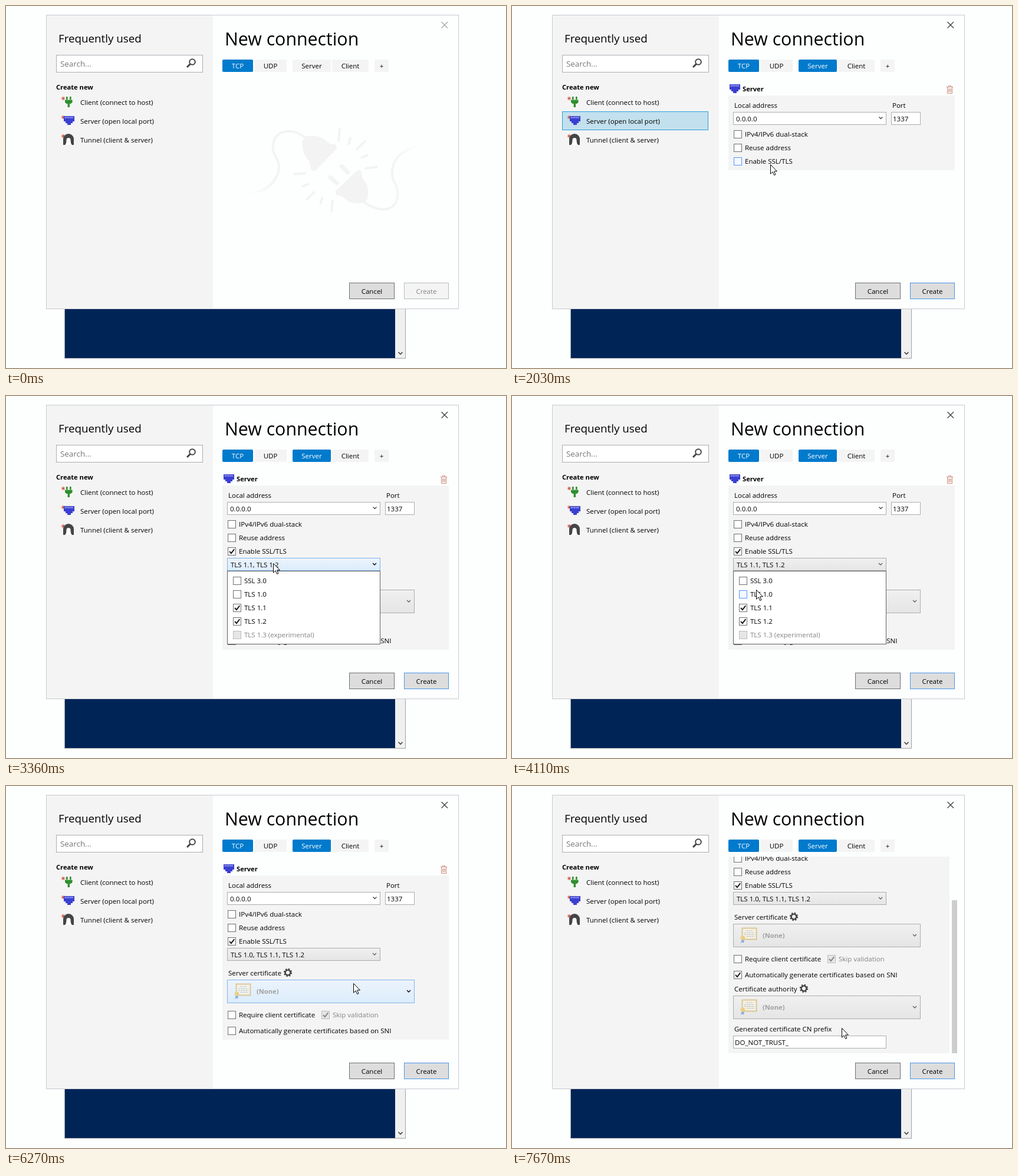
An HTML page for the animation above (8 s loop, 848 px wide and 615 px high).

```html
<!DOCTYPE html>
<html lang="en">
<head>
<meta charset="utf-8">
<title>New connection</title>
<style>
html, body { margin: 0; width: 100%; height: 100%; overflow: hidden; background: #fdfefe; }
#stage { display: block; width: 848px; height: 615px; }
text { font: 11.5px "Open Sans", "Noto Sans", sans-serif; fill: #000; white-space: pre; }
text.bold { font-size: 11.15px; font-weight: 700; }
text.mid { text-anchor: middle; }
text.title { font-size: 30.3px; }
text.sub { font-size: 18.8px; }
text.search { font-size: 13.4px; fill: #767676; }
text.none { fill: #a0a0a0; }
.line { fill: none; stroke: #444; }
.field { fill: #fff; stroke: #abadb3; }
.tab { fill: #f4f4f4; }
.tab.on { fill: #007acc; }
.tab.on + text { fill: #fff; }
.item rect { fill: #26a0da; fill-opacity: 0; stroke: #26a0da; stroke-opacity: 0; }
.item.hot rect { fill-opacity: .12; stroke-opacity: .66; }
.item.on rect { fill-opacity: .24; stroke-opacity: 1; }
.button rect { fill: #ddd; stroke: #707070; }
#create rect { stroke: #4a96e8; }
#create.off rect { fill: #f4f4f4; stroke: #b8bcbe; }
#create.off text { fill: #838383; }
.check .box { fill: #fff; stroke: #707070; }
.check.hot .box { fill: #f3f9ff; stroke: #5593ff; }
.check.off .box { fill: #e6e6e6; stroke: #bcbcbc; }
.check.off text { fill: #838383; }
.tick { display: none; fill: none; stroke: #212121; stroke-width: 2; }
.check.off .tick { stroke: #888; }
.on .tick { display: inline; }
.combo rect.face { fill: url(#grey); stroke: #acacac; }
.combo .chevron { stroke: #606060; }
.combo.hot rect.face { fill: url(#blue); stroke: #7eb4ea; }
.combo.hot .chevron { stroke: #000; }
</style>
</head>
<body>
<svg id="stage" viewBox="0 0 848 615"></svg>
<script>
const LOOP = 8000, MAX_SCROLL = 95, VIEW = { top: 120, height: 334 };
const $ = id => document.getElementById(id);

// Drawing helpers
const text = (x, y, s, cls = '') => `<text x="${x}" y="${y}" class="${cls}">${s}</text>`;
const rect = (x, y, w, h, attrs = '') => `<rect x="${x}" y="${y}" width="${w}" height="${h}" ${attrs}/>`;
const path = (d, attrs = 'class="line"') => `<path d="${d}" ${attrs}/>`;
const at = (x, y, s) => `<g transform="translate(${x} ${y})">${s}</g>`;
const chevron = (x, y) => path(`M${x - 3} ${y - 1.5}l3 3 3-3`, 'class="line chevron" stroke-width="1.3"');
const hit = (x, y, w, h) => `data-hit="${[x, y, w, h]}"`;

const tab = (id, x, w, s, cls = '') =>
  rect(x, 91, w, 21, `id="${id}" rx="2" class="tab ${cls}"`) + text(x + w / 2, 106, s, 'mid');
const button = (id, x, w, s, cls = '') =>
  `<g id="${id}" class="button ${cls}">${rect(x + .5, 470.5, w, 27)}${text(x + w / 2 + .5, 489, s, 'mid')}</g>`;
const check = (id, x, y, w, s, cls = '') =>
  `<g id="${id}" class="check ${cls}" ${hit(x, y - 1, w, 16)}>
    ${rect(x + .5, y + .5, 13, 13, 'class="box"')}
    ${path(`M${x + 3} ${y + 7}l3 3.2 5.3-7`, 'class="tick"')}${text(x + 19, y + 11, s)}</g>`;
const combo = (id, y, w, h, content) =>
  `<g id="${id}" class="combo" ${hit(375, y, w + 1, h + 1)}>
    ${rect(375.5, y + .5, w, h, 'class="face"')}${content}${chevron(366 + w, y + h / 2)}</g>`;

const spark = path('M-3.2 0H3.2M0-3.2V3.2M-2.3-2.3 2.3 2.3M-2.3 2.3 2.3-2.3', 'stroke="#c6402c" stroke-width=".9"');
const plug = path('M2 0H4.6V5H2ZM8 0H10.6V5H8ZM0 5.5H12.6V9.5L10 12H8V18H4.6V12H2.6L0 9.5Z', 'fill="#2f8f2f"');
const jack = path('M0 0H18V9H15V12H12V15H6V12H3V9H0Z', 'fill="#3a3fd0"') +
  path('M2.5 1V4M5 1V4M7.5 1V4M10 1V4M12.5 1V4M15 1V4', 'stroke="#c9ccf5"');
const arch = path('M0 18V8A9 9 0 0 1 18 8V18Z', 'fill="#454545"') +
  path('M3 18Q5.5 16 5.5 9.5A3.5 3.5 0 0 1 12.5 9.5Q12.5 16 15 18Z', 'fill="#fff"');
const gear = '<circle r="4.4" class="line" stroke-width="2.4"/>' +
  '<circle r="6" class="line" stroke-width="2.4" stroke-dasharray="2.356"/>';
const certificate = `<g opacity=".6">
  ${rect(2.5, .5, 24, 19, 'fill="#fbf3dc" stroke="#d2ae62" stroke-width="2"')}
  ${path('M9 5H20M6 8.5H23M6 11.5H23M10 14.5H23', 'stroke="#8fa3bd" stroke-dasharray="3 1"')}
  ${path('M2 19L0 26 3 24 5 26 6 19Z', 'fill="#4b83db"')}
  <circle cx="3.5" cy="17" r="3.8" fill="#efbd42"/></g>`;
const certBox = (id, y) =>
  combo(id, y, 317, 39, at(388, y + 7, certificate) + text(425, y + 24, '(None)', 'bold none'));
const item = (id, y, icon, s) =>
  `<g id="${id}" class="item" ${hit(85, y, 248, 32)}>${rect(85.5, y + .5, 247, 31)}
    ${at(97, y + 10, spark)}${icon}${text(126, y + 21, s)}</g>`;

const watermark = `<g id="watermark" fill="#f3f3f3" stroke="#f3f3f3" stroke-width="4">
  <path d="M414 317C447 317 463 290 463 273C463 258 450 252 453 234C457 210 487 205 510 226" fill="none" stroke="url(#fadeL)"/>
  <path d="M606 332C628 350 662 353 664 322C666 303 653 299 655 280C657 257 677 240 704 239" fill="none" stroke="url(#fadeR)"/>
  <path d="M504 229L509 223Q528 217 544 231L551 236Q561 234 560 242L525 278Q518 282 518 274L516 264Q501 249 504 229Z" stroke-width="2"/>
  <path d="M560 315L595 281Q602 278 602 285L604 294Q617 309 612 327L607 333Q587 338 573 325L567 321Q559 322 560 315Z" stroke-width="2"/>
  <path d="M567 270L582 285M548 289L563 303" stroke-width="7"/>
  <path d="M566 208L564 230M584 223L581 236M610 229L594 244M614 253L602 258M630 273L609 276
    M488 286L509 284M514 302L502 307M524 315L509 330M537 324L533 337M554 330L552 351"/></g>`;

const popup = `<svg id="popup" x="375" y="297" width="260" height="125" viewBox="375 297 260 125"><g id="drop">
  ${rect(375.5, 297.5, 259, 124, 'fill="#fff" stroke="#606060"')}
  ${['SSL 3.0', 'TLS 1.0', 'TLS 1.1', 'TLS 1.2', 'TLS 1.3 (experimental)'].map((s, i) =>
    check('proto' + i, 385, 307 + 23 * i, 58, s, ['', '', 'on', 'on', 'off'][i])).join('')}
  </g></svg>`;

const form = `<svg id="form" x="360" y="120" width="400" height="334" viewBox="360 120 400 334"><g id="content">
  ${rect(367, 152, 384, 127, 'id="panel" fill="#f4f4f4"')}
  ${at(369, 133, jack)}${text(391, 145, 'Server', 'bold')}
  <g id="trash">${path('M737 137.5H748M740.5 137V135.5H744.5V137M738.5 138V148.5H746.5V138M740.5 140V146.5M742.5 140V146.5M744.5 140V146.5', 'fill="none" stroke="#cd8d80"')}</g>
  ${text(377, 173, 'Local address')}${text(645, 173, 'Port')}
  ${rect(375.5, 180.5, 259, 21, 'class="field"')}${text(380, 196, '0.0.0.0')}${chevron(625.5, 190)}
  ${rect(643.5, 180.5, 49, 21, 'class="field"')}${text(646, 196, '1337')}
  ${check('dual', 376, 211, 127, 'IPv4/IPv6 dual-stack')}
  ${check('reuse', 376, 234, 95, 'Reuse address')}
  ${check('ssl', 376, 257, 100, 'Enable SSL/TLS')}
  <g id="secure">
    ${combo('tls', 275, 259, 21, '<text id="versions" x="381" y="291"></text>')}
    ${text(377, 322, 'Server certificate')}${at(478, 317, gear)}
    ${certBox('cert', 329)}
    ${check('require', 376, 382, 147, 'Require client certificate')}
    ${check('skip', 535, 382, 97, 'Skip validation', 'on off')}
    ${check('auto', 376, 409, 276, 'Automatically generate certificates based on SNI')}
    <g id="authority">
      ${text(377, 444, 'Certificate authority')}${at(495, 439, gear)}
      ${certBox('ca', 451)}
      ${text(377, 512, 'Generated certificate CN prefix')}
      ${rect(375.5, 519.5, 259, 21, 'class="field"')}${text(378, 535, 'DO_NOT_TRUST_')}
    </g>
    ${popup}
  </g></g>
  ${rect(746, 120, 9, 260, 'id="thumb" fill="#cdcdcd"')}</svg>`;

const gradient = (id, stops, dir) => `<linearGradient id="${id}" ${dir}>${stops.map(([o, c, a = 1]) =>
  `<stop offset="${o}" stop-color="${c}" stop-opacity="${a}"/>`).join('')}</linearGradient>`;
const down = 'x1="0" y1="0" x2="0" y2="1"';

$('stage').innerHTML = `<defs>
  ${gradient('grey', [[0, '#f0f0f0'], [1, '#e5e5e5']], down)}
  ${gradient('blue', [[0, '#ecf4fc'], [1, '#dcecfc']], down)}
  ${gradient('fadeL', [[0, '#f3f3f3', 0], [.4, '#f3f3f3']], '')}
  ${gradient('fadeR', [[.5, '#f3f3f3'], [1, '#f3f3f3', 0]], '')}</defs>
  ${rect(99.5, 500.5, 578, 98, 'fill="#f0f0f0" stroke="#a2a2a2"')}
  ${rect(100, 500, 560, 98, 'fill="#012456"')}
  ${path('M665.5 588l3.5 3.5 3.5-3.5', 'class="line" stroke-width="1.6"')}
  ${rect(68.5, 15.5, 699, 499, 'fill="#fdfefe" stroke="#c9cad3"')}
  ${rect(69, 16, 282, 498, 'fill="#f4f4f4"')}
  ${text(89, 62, 'Frequently used', 'sub')}
  ${rect(85.5, 83.5, 248, 29, 'class="field"')}${text(92, 103, 'Search...', 'search')}
  <circle cx="316" cy="95" r="4.8" class="line" stroke-width="2"/>
  ${path('M312.5 98.5L307 104', 'class="line" stroke-width="3"')}
  ${text(85, 142, 'Create new', 'bold')}
  ${item('client', 147, at(100, 154, plug), 'Client (connect to host)')}
  ${item('server', 179, at(98, 187, jack), 'Server (open local port)')}
  ${item('tunnel', 211, at(97, 218, arch), 'Tunnel (client &amp; server)')}
  ${text(371, 67, 'New connection', 'title')}
  ${path('M738.5 27L749 37.5M749 27L738.5 37.5', 'id="close" stroke-width="1.1"')}
  ${tab('tcp', 367, 52, 'TCP', 'on')}${tab('udp', 421, 55, 'UDP')}
  ${tab('serverTab', 486, 65, 'Server')}${tab('clientTab', 553, 62, 'Client')}${tab('add', 625, 24, '+')}
  ${watermark}${form}
  ${button('cancel', 582, 76, 'Cancel')}${button('create', 675, 75, 'Create')}
  <g id="cursor">${path('M.5.5V16.2L4.1 12.8 6.6 18.5 9 17.4 6.5 11.9H11.5Z', 'fill="#fff" stroke="#000"')}</g>`;

// Pointer moves: start, end, number of steps, destination
const START = [725, 604];
const moves = [
  [70, 610, 8, 187, 190],
  [1240, 2030, 11, 438, 269],
  [2190, 2260, 2, 439, 265],
  [2900, 2900, 1, 450, 281],
  [2980, 3060, 2, 453, 284],
  [3610, 4110, 7, 414, 329],
  [4240, 4310, 2, 412, 337],
  [4550, 4620, 2, 413, 336],
  [4780, 5320, 8, 633, 283],
  [5400, 5570, 3, 672, 250],
  [5720, 5720, 1, 660, 255],
  [5960, 6270, 5, 589, 335],
  [6350, 6740, 6, 550, 401],
  [6820, 6900, 2, 550, 412],
  [7350, 7430, 2, 559, 411]
];
const clamp = v => Math.min(1, Math.max(0, v));
const ease = p => p * p * (3 - 2 * p);

function pointer(t) {
  let [x, y] = START;
  for (const [from, to, steps, toX, toY] of moves) {
    if (t < from) break;
    const step = t >= to ? steps : 1 + Math.floor((t - from) / (to - from) * (steps - 1));
    const p = ease(step / steps);
    x += (toX - x) * p;
    y += (toY - y) * p;
  }
  return [Math.round(x), Math.round(y)];
}

const targets = [...document.querySelectorAll('[data-hit]')].map(el => ({
  el,
  box: el.dataset.hit.split(',').map(Number),
  scrolls: !!el.closest('#form'),
  overPopup: !!el.closest('#popup') || el.id === 'tls'
}));
const show = (id, on) => { $(id).style.display = on ? '' : 'none'; };
const flag = (id, cls, on) => $(id).classList.toggle(cls, on);

function render(t) {
  const [x, y] = pointer(t);
  const created = t >= 850, ssl = t >= 2420, tls10 = t >= 4550, auto = t >= 6980;
  const open = t >= 3130 && t < 5570;
  const scroll = t < 7590 ? 0 : t < 7670 ? 48 : MAX_SCROLL;

  show('cursor', t >= 70);
  $('cursor').setAttribute('transform', `translate(${x} ${y})`);

  show('watermark', !created);
  show('form', created);
  flag('serverTab', 'on', created);
  flag('create', 'off', !created);
  flag('server', 'on', created && !ssl);
  $('close').setAttribute('stroke', created ? '#333' : '#a0a0a0');

  show('secure', ssl);
  flag('ssl', 'on', ssl);
  flag('proto1', 'on', tls10);
  $('versions').textContent = (tls10 ? 'TLS 1.0, ' : '') + 'TLS 1.1, TLS 1.2';
  show('popup', open);
  const slide = Math.round(-125 * (1 - ease(clamp((t - 3130) / 230))));
  $('drop').setAttribute('transform', `translate(0 ${slide})`);

  show('authority', auto);
  show('thumb', auto);
  flag('auto', 'on', auto);
  $('panel').setAttribute('height', auto ? 397 : ssl ? 279 : 127);
  $('panel').setAttribute('width', auto ? 375 : 384);
  $('trash').setAttribute('transform', `translate(${auto ? -9 : 0} 0)`);
  $('trash').style.opacity = clamp((t - 1700) / 250);
  $('content').setAttribute('transform', `translate(0 ${-scroll})`);
  $('thumb').setAttribute('y', VIEW.top + scroll * VIEW.height / (VIEW.height + MAX_SCROLL));
  $('thumb').style.opacity = clamp((t - 6900) / 200);

  for (const { el, box: [bx, by, w, h], scrolls, overPopup } of targets) {
    const dx = x - bx, dy = y + (scrolls ? scroll : 0) - by;
    const inside = dx >= 0 && dx < w && dy >= 0 && dy < h;
    el.classList.toggle('hot', t >= 70 && inside && (!open || overPopup));
  }
}

const begin = performance.now();
function tick() {
  render((performance.now() - begin) % LOOP);
  requestAnimationFrame(tick);
}
tick();
</script>
</body>
</html>
```
